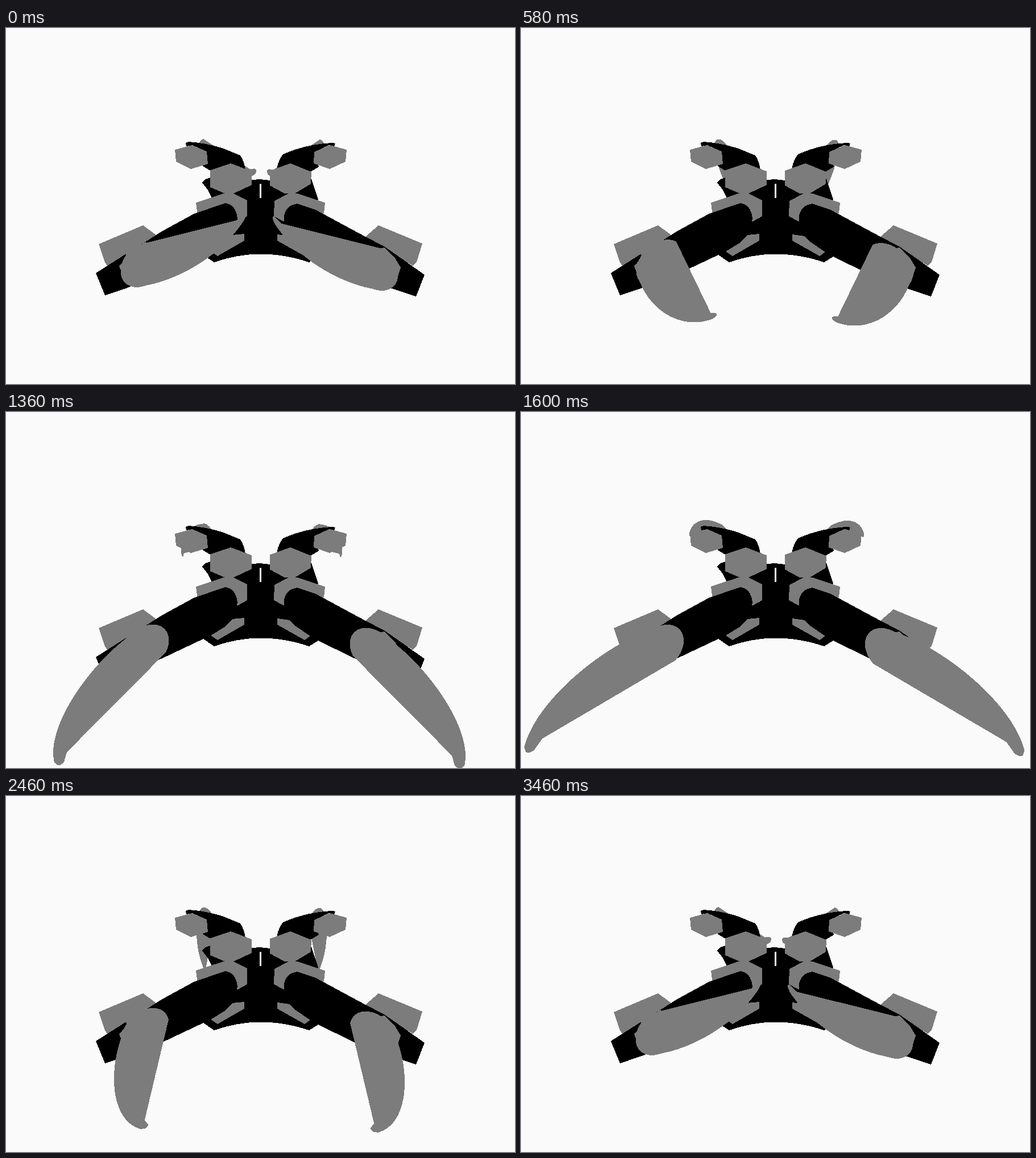
These frames come from a looping animation (895x626 px, 3.48 s). An HTML page:

```html
<!DOCTYPE html>
<html lang="en">
<head>
<meta charset="utf-8">
<title>Blades</title>
<style>
  html, body { margin: 0; width: 100%; height: 100%; overflow: hidden; background: #fafafa; }
  svg { display: block; width: 895px; height: 626px; }
  .g { fill: #7c7c7c; }
</style>
</head>
<body>
<svg viewBox="0 0 895 626" shape-rendering="crispEdges">
  <g id="back" class="g"></g>

  <!-- body -->
  <path d="M345 272L350 266L360 263L400 262L432 267L447 266L464 268L537 265L540 274L549 301L535 320L520 360L549 402L533 412Q447 383 366 412L347 399L380 350L361 297L355 285Z"/>
  <path fill="#fafafa" d="M446 274h3v25h-3z"/>
  <path class="g" d="M360 393L386 377L398 364L419 362V374L372 401Z"/>
  <path class="g" d="M477 363L498 366L507 375L535 394L525 401L477 374Z"/>

  <!-- upper arms -->
  <path d="M316 202L321 200Q350 202 380 211L412 224Q419 234 421 250L358 250L346 243L352 217L328 206L317 208Z"/>
  <path d="M476 248Q479 232 487 222Q528 204 574 202L579 203L577 209L568 206L542 218L550 244L537 252Z"/>
  <g class="g">
    <path d="M297 214L327 206L353 217L355 239L325 248L299 235Z"/>
    <path d="M542 218L570 206L599 214L597 235L569 248L541 238Z"/>
    <path d="M359 250L395 238L432 252V276L400 291H385L359 280Z"/>
    <path d="M464 251L500 238L537 253L536 274L508 291H490L464 277Z"/>
    <path d="M334 307L385 290L400 291L424 303V331L408 340L370 345L337 330Z"/>
    <path d="M472 304L497 291H512L561 307L559 326L500 345L488 340L471 331Z"/>
    <path d="M163 380L241 347L275 372L178 418L174 412Z"/>
    <path d="M655 347L732 379L722 412L715 418L632 367Z"/>
  </g>

  <!-- lower arms -->
  <path d="M158 431L213 396L245 376L275 357L330 327L385 308Q404 310 407 335L404 345L398 364L347 399L275 433L213 457L174 470Z"/>
  <path d="M489 343V330Q493 311 513 309L545 320L632 367L665 384L695 405L736 434L721 472L675 457L610 432L549 402L498 366Z"/>

  <!-- joints -->
  <path class="g" d="M199 419L213 402L210 396L246 376L260 395L240 430L208 442Z"/>
  <path class="g" d="M694 421L686 447L650 430L645 390L665 386L683 403Z"/>
  <g id="front" class="g"></g>
</svg>
<script>
const LOOP = 3480;

// [time, angle in degrees]
const keys = [[0, 155], [580, 91.5], [1100, 36.4], [1600, -10], [1790, -24],
              [2080, 3.5], [2160, 12.4], [2700, 86.5], [2900, 104.2], [3480, 155]];

function slope(i) {
  const a = keys[i - 1], b = keys[i], c = keys[i + 1];
  if (!a || !c || b[0] === 1790) return 0;
  return (c[1] - a[1]) / (c[0] - a[0]);
}

function angleAt(t) {
  let i = 0;
  while (i < keys.length - 2 && t >= keys[i + 1][0]) i++;
  const [t0, a] = keys[i], [t1, b] = keys[i + 1];
  const d = t1 - t0, s = (t - t0) / d, s2 = s * s, s3 = s2 * s;
  return a + (b - a) * (3 * s2 - 2 * s3)
    + d * (slope(i) * (s3 - 2 * s2 + s) + slope(i + 1) * (s3 - s2));
}

// Blade outline: pivot at 0,0 and tip at 1,0
function outline() {
  const pts = [];
  const bez = (s, a, b, c, d) => {
    const r = 1 - s;
    return r * r * r * a + 3 * r * r * s * b + 3 * r * s * s * c + s * s * s * d;
  };
  for (let i = 0; i <= 14; i++) {
    const a = (105 + i * 155 / 14) * Math.PI / 180;
    pts.push([0.19 * Math.cos(a), 0.005 + 0.19 * Math.sin(a)]);
  }
  for (let i = 1; i <= 32; i++) {
    const s = i / 32;
    pts.push([bez(s, -0.03, 0.25, 0.72, 0.985), bez(s, -0.182, -0.3, -0.295, -0.048)]);
  }
  pts.push([1.006, -0.008], [1.004, 0.01], [0.986, 0.022], [0.97, 0.02], [0.896, -0.012]);
  return pts;
}
const blade = outline();

// Each blade turns in a tilted plane: axes a and b, depth p and q
const lower = { a: [-179.4, 179.4], b: [128, 128], p: -0.088, q: 0.366 };
const upper = { a: [-60, 20], b: [42, 110], p: 0.17, q: -0.03 };

function makeBlade(layer, plane, x, y, side) {
  const el = document.createElementNS("http://www.w3.org/2000/svg", "path");
  document.getElementById(layer).append(el);
  return { el, plane, x, y, side };
}

const blades = [
  makeBlade("back", upper, 353, 217, 1),
  makeBlade("back", upper, 546, 218, -1),
  makeBlade("front", lower, 246, 416, 1),
  makeBlade("front", lower, 645, 422, -1)
];

function pose({ el, plane: { a, b, p, q }, x, y, side }, angle) {
  const c = Math.cos(angle), s = Math.sin(angle);
  const pts = blade.map(([u, v]) => {
    const X = u * c - v * s, Y = u * s + v * c, w = 1 + p * X + q * Y;
    const px = x + side * (X * a[0] + Y * b[0]) / w;
    const py = y + (X * a[1] + Y * b[1]) / w;
    return px.toFixed(1) + " " + py.toFixed(1);
  });
  el.setAttribute("d", "M" + pts.join("L") + "Z");
}

const start = performance.now();
function draw(now) {
  const angle = angleAt(Math.max(0, now - start) % LOOP) * Math.PI / 180;
  for (const item of blades) pose(item, angle);
  requestAnimationFrame(draw);
}
draw(start);
</script>
</body>
</html>
```
